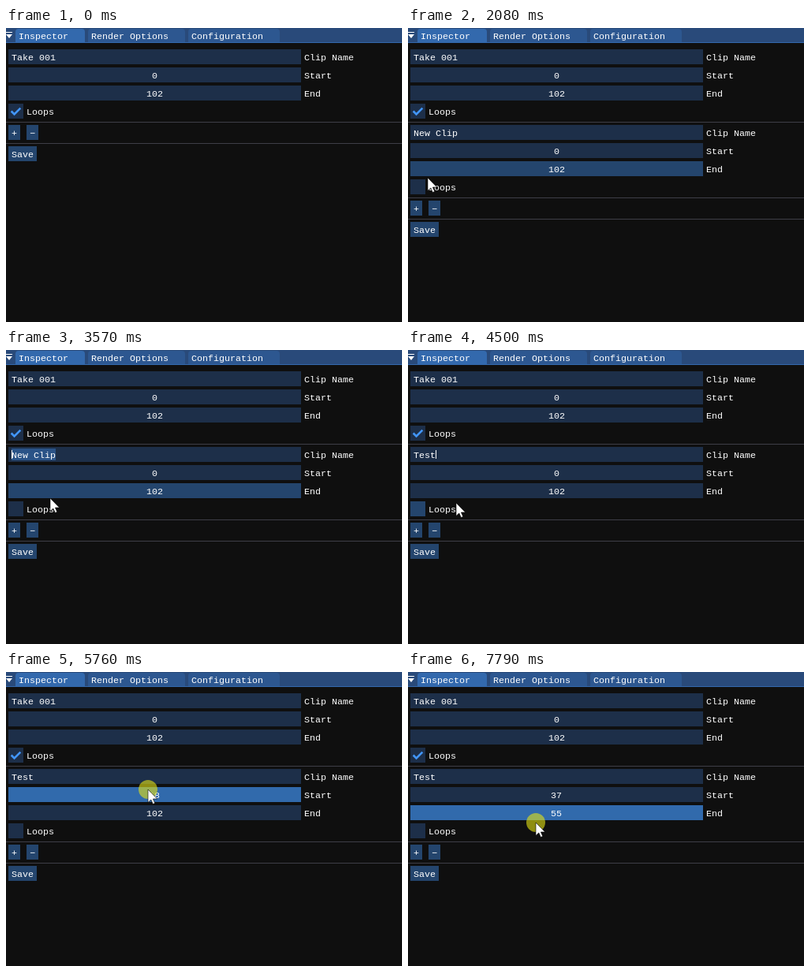
Write an HTML page with a canvas that moves like this. It is 502 by 373 pixels and loops after 8000 ms.

```html
<!DOCTYPE html>
<html lang="en">
<head>
<meta charset="utf-8">
<title>Clip inspector</title>
<style>
html, body { margin: 0; width: 100%; height: 100%; overflow: hidden; background: #0f0f0f; }
canvas { display: block; }
</style>
</head>
<body>
<canvas id="stage" width="502" height="373"></canvas>
<script>
const ctx = document.getElementById('stage').getContext('2d');
const LOOP = 8000, TICK = 70, CHAR = 7, ROW_H = 19, ROW_STEP = 23;
const FRAME = '#1d2f49', HOVER = '#24456d', ACTIVE = '#316aac';
const BUTTON = '#24456d', PRESSED = '#0f87fa', ACCENT = '#4296fa';

// Times during which the mouse button is held
const press = {
  add: [1470, 1540], name: [2560, 2700], select: [2955, 3330],
  away: [4890, 4970], start: [5570, 6380], end: [7150, LOOP]
};
const ADDED = press.add[1];

// Pointer path: each move eases from the last place, optionally bending towards `via`
const enter = [92, 400];
const moves = [
  { from: 310, until: 520, to: [82, 268], via: [72, 300] },
  { from: 670, until: 1050, to: [12, 135] },
  { from: 1300, until: 1300, to: [11, 135] },
  { from: 1940, until: 2080, to: [25, 190] },
  { from: 2150, until: 2410, to: [78, 139], via: [40, 215] },
  { from: 2880, until: 2880, to: [80, 139] },
  { from: 2955, until: 3255, to: [10, 130] },
  { from: 3330, until: 3630, to: [61, 194] },
  { from: 4570, until: 4880, to: [253, 259], via: [120, 245] },
  { from: 4970, until: 5280, to: [190, 199] },
  { from: 5360, until: 5510, to: [162, 149] },
  { from: 5570, until: 6130, to: [199, 150] },
  { from: 6380, until: 6780, to: [214, 176] },
  { from: 6850, until: 7000, to: [209, 184] },
  { from: 7150, until: 7550, to: [157, 189] },
  { from: 7790, until: 7790, to: [162, 191] }
];

const held = (t, [from, until]) => t >= from && t < until;
const clamp = (v, lo, hi) => Math.min(hi, Math.max(lo, v));
const easeOut = u => 1 - (1 - u) ** 1.7;

function pointerAt(t) {
  const i = moves.filter(m => m.from <= t).length - 1;
  if (i < 0) return null;
  const { from, until, to, via } = moves[i];
  const origin = i ? moves[i - 1].to : enter;
  const elapsed = (Math.floor((t - from) / TICK) + 1) * TICK;
  const e = t >= until ? 1 : easeOut(Math.min(1, elapsed / (until - from + TICK)));
  return to.map((end, axis) => {
    const start = origin[axis];
    const mid = via ? via[axis] : (start + end) / 2;
    return Math.round((1 - e) ** 2 * start + 2 * e * (1 - e) * mid + e * e * end);
  });
}

function rect(x, y, w, h, color) {
  ctx.fillStyle = color;
  ctx.fillRect(x, y, w, h);
}

function polygon(points) {
  ctx.beginPath();
  points.forEach(p => ctx.lineTo(...p));
  ctx.closePath();
}

function text(str, x, baseline) {
  ctx.fillStyle = '#fff';
  [...String(str)].forEach((c, i) => ctx.fillText(c, x + i * CHAR, baseline));
}

function tab(label, x, w, color) {
  ctx.fillStyle = color;
  ctx.beginPath();
  ctx.roundRect(x, 1, w, 17, [4, 4, 0, 0]);
  ctx.fill();
  text(label, x + 4, 14);
}

function header() {
  rect(0, 0, 502, 19, '#294a7a');
  tab('Inspector', 12, 88, '#3369ad');
  tab('Render Options', 104, 123, '#2d5790');
  tab('Configuration', 231, 116, '#2d5790');
  rect(0, 18, 502, 1, '#3369ad');
  rect(0, 5, 8, 1, '#fff');
  polygon([[0, 8], [8, 8], [4, 13]]);
  ctx.fill();
}

function separator(y) {
  rect(0, y, 502, 1, '#3e3e47');
}

function button(label, x, y, color = BUTTON) {
  rect(x, y, label.length * CHAR + 8, ROW_H, color);
  text(label, x + 4, y + 14);
}

function number(label, value, y, color) {
  rect(3, y, 371, ROW_H, color);
  text(value, Math.floor(188.5 - String(value).length * CHAR / 2), y + 14);
  text(label, 378, y + 14);
}

function checkMark(y) {
  ctx.strokeStyle = ACCENT;
  ctx.lineWidth = 2.6;
  ctx.beginPath();
  ctx.moveTo(6.65, y + 9.5);
  ctx.lineTo(10.55, y + 13.4);
  ctx.lineTo(18.35, y + 5.6);
  ctx.stroke();
}

function clip(y, { name, start, end, loops, colors = [], select, caret }) {
  const [startColor = FRAME, endColor = FRAME, boxColor = FRAME] = colors;
  rect(3, y, 371, ROW_H, FRAME);
  if (select !== undefined) rect(7 + select * CHAR, y + 2, (name.length - select) * CHAR, 15, '#2a5387');
  text(name, 7, y + 14);
  if (caret !== undefined) rect(7 + caret * CHAR, y + 4, 1, 11, '#fff');
  text('Clip Name', 378, y + 14);
  number('Start', start, y + ROW_STEP, startColor);
  number('End', end, y + 2 * ROW_STEP, endColor);
  const boxY = y + 3 * ROW_STEP;
  rect(3, boxY, ROW_H, ROW_H, boxColor);
  text('Loops', 26, boxY + 14);
  if (loops) checkMark(boxY);
  separator(y + 4 * ROW_STEP);
}

function newClip(t, y) {
  const state = { name: 'New Clip', start: 0, end: 102 };

  // Typing replaces the selected name
  if (t >= 3940) state.name = 'Test'.slice(0, t < 4120 ? 1 : 2 + Math.floor((t - 4120) / TICK));
  if (t >= press.name[0] && t < press.away[0]) state.caret = state.name.length;
  if (t >= press.select[0] && t < 3940) {
    const [x] = pointerAt(Math.min(t, press.select[1] - 1));
    state.select = state.caret = clamp(Math.round((x - 7) / CHAR), 0, 8);
  }

  // A drag changes its value by one unit per pixel
  const dragged = ([from, until]) =>
    t < from ? 0 : pointerAt(Math.min(t, until - 1))[0] - pointerAt(from - 1)[0];
  state.start += dragged(press.start);
  state.end += dragged(press.end);

  // Hover colours lag one tick behind the pointer
  const [hx, hy] = pointerAt(t - TICK);
  const busy = [press.select, press.start, press.end].some(p => held(t, p));
  const color = (row, right, drag) => {
    if (drag && held(t, drag)) return ACTIVE;
    const top = y + row * ROW_STEP;
    return !busy && hx >= 3 && hx < right && hy >= top && hy < top + ROW_H ? HOVER : FRAME;
  };
  state.colors = [color(1, 374, press.start), color(2, 374, press.end), color(3, 62)];
  return state;
}

function textCursor(x, y) {
  const color = '#e4dece';
  rect(x, y - 6, 1, 13, color);
  for (const edge of [y - 7, y + 7]) {
    rect(x - 3, edge, 3, 1, color);
    rect(x + 1, edge, 3, 1, color);
  }
}

function arrow(x, y) {
  polygon([[0, 0], [0, 16.5], [3.8, 13], [6.3, 18.5], [8.8, 17.4], [6.4, 12], [11.7, 12]]
    .map(([dx, dy]) => [x + dx, y + dy]));
  ctx.fillStyle = '#fff';
  ctx.fill();
  ctx.strokeStyle = '#000';
  ctx.lineWidth = 0.6;
  ctx.stroke();
}

function drawPointer(t, [x, y]) {
  if (Object.values(press).some(p => held(t, p))) {
    ctx.fillStyle = 'rgba(228,226,20,0.6)';
    ctx.beginPath();
    ctx.arc(x, y, 12, 0, Math.PI * 2);
    ctx.fill();
  }
  const overName = t >= ADDED && y >= 123 && y < 142 && x < 374;
  (overName ? textCursor : arrow)(x, y);
}

function draw(t) {
  const pointer = pointerAt(t);
  rect(0, 0, 502, 373, '#0f0f0f');
  header();
  clip(27, { name: 'Take 001', start: 0, end: 102, loops: true });
  let y = 123;
  if (t >= ADDED) {
    clip(y, newClip(t, y));
    y += 96;
  }
  button('+', 3, y, held(t, press.add) ? PRESSED : BUTTON);
  button('\u2212', 26, y);
  separator(y + 23);
  button('Save', 3, y + 27);
  if (pointer) drawPointer(t, pointer);
}

ctx.font = '11.667px "Liberation Mono", monospace';
const began = performance.now();
function tick() {
  draw((performance.now() - began) % LOOP);
  requestAnimationFrame(tick);
}
tick();
</script>
</body>
</html>
```
